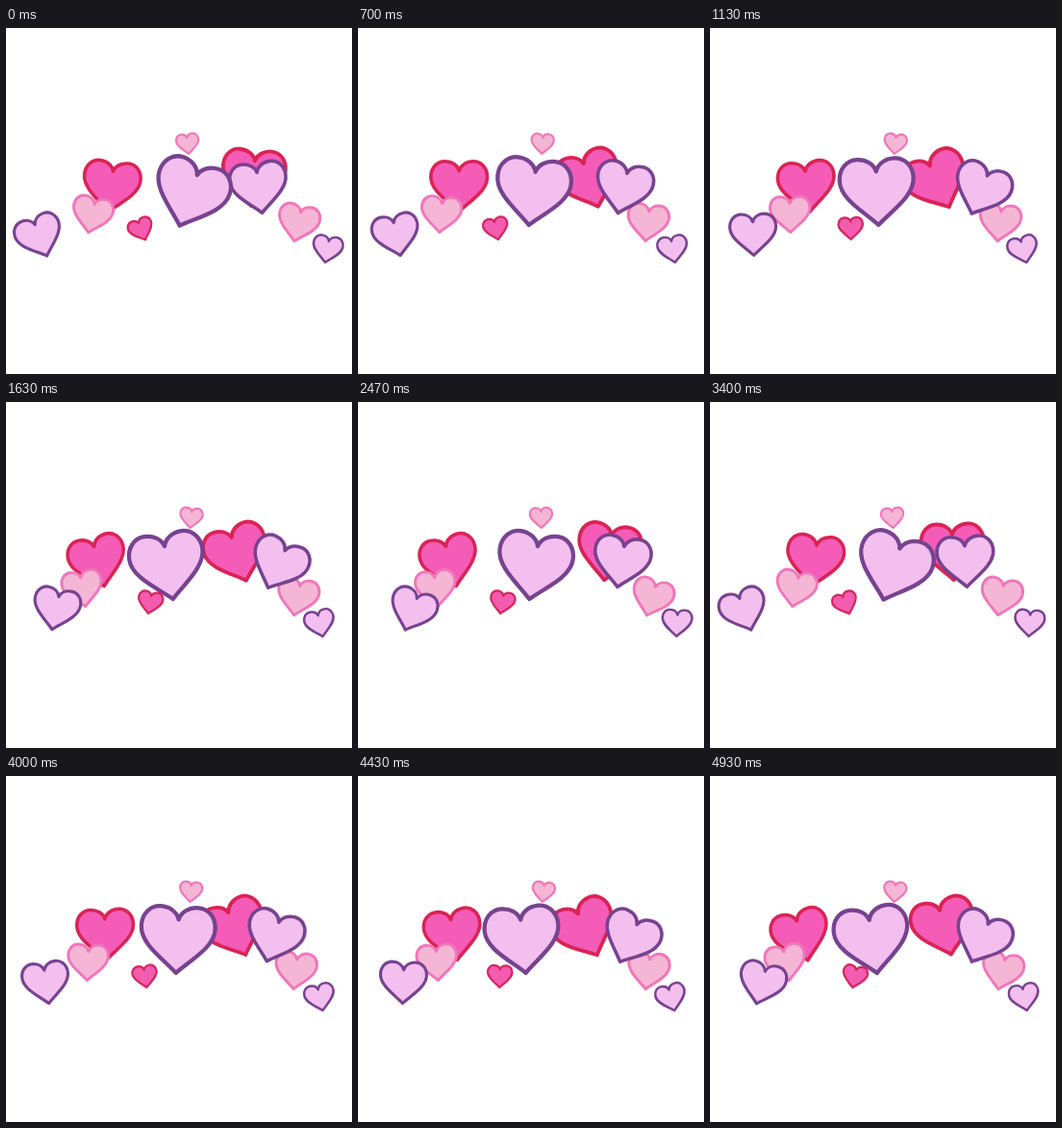
Recreate the animation shown at these times as an HTML page with a canvas. Size 360 by 360 pixels, loop 5 s.

```html
<!DOCTYPE html>
<html lang="en">
<head>
<meta charset="utf-8">
<title>Swaying hearts</title>
<style>
  html, body { margin: 0; width: 100%; height: 100%; overflow: hidden; background: #fff; }
  canvas { display: block; width: 100vw; height: 100vh; }
</style>
</head>
<body>
<canvas id="stage"></canvas>
<script>
const SIZE = 360, LOOP = 5000, CYCLE = 45;
const OUT = 22, BRISK = 22, SLOW = 34;
const canvas = document.getElementById('stage');
const ctx = canvas.getContext('2d');
const ratio = window.devicePixelRatio || 1;
canvas.width = canvas.height = Math.round(SIZE * ratio);

const lilac = { fill: '#f2bfef', line: '#77428f' };
const blush = { fill: '#f5b6d5', line: '#f076ba' };
const hot = { fill: '#f45cb8', line: '#da2354' };
const rose = { fill: '#f45cb0', line: '#d4275f' };

// Back to front: resting tip, height, mean angle, angle added at the turn,
// step of the turn, length of the swing back
const hearts = [];
const add = (color, x, y, h, lean, swing, turn, back) =>
  hearts.push({ color, x, y, h, lean, swing, turn, back });

add(hot, 254, 187, 62, -7, -18, 16, BRISK);
add(hot, 105, 193, 56, -5, -12, 28, SLOW);
add(blush, 298, 223, 41, 12, -5, 12, BRISK);
add(blush, 84, 214, 40, 0, -12, 28, BRISK);
add(lilac, 268, 194, 56, 8, 17, 19, SLOW);
add(lilac, 176, 207, 73, 5, -14, 22, BRISK);
add(lilac, 46, 238, 46, 0, 21, 32, SLOW);
add(lilac, 331, 245, 30, 0, -15, 16, SLOW);
add(rose, 147, 221, 25, -4, 18, 28, SLOW);
add(blush, 191, 132, 23, -1, 8, 17, SLOW);

// Right half of a unit heart with its tip at the origin, then its mirror image
const half = new Path2D('M0 0C.2-.2 .56-.41 .56-.69C.56-.88 .43-1 .285-1C.14-1 .03-.92 0-.81');
const shape = new Path2D('M0 0C.2-.2 .56-.41 .56-.69C.56-.88 .43-1 .285-1C.14-1 .03-.92 0-.81'
  + 'C-.03-.92-.14-1-.285-1C-.43-1-.56-.88-.56-.69C-.56-.41-.2-.2 0 0Z');

// One smooth swing out to the turn, then one back
function angleAt(step, { lean, swing, turn, back }) {
  const length = step < turn ? Math.max(OUT, turn) : back;
  return (lean + swing * Math.cos(Math.PI * (step - turn) / length)) * Math.PI / 180;
}

// Steps last about 70 ms on a 30 Hz clock, which restarts once at tick 99
function stepAt(ms) {
  const tick = Math.floor(ms * 0.03 + 1e-6);
  const count = ticks => Math.floor(ticks / 2.1 + 1e-6);
  return (tick < 99 ? count(tick) : 47 + count(tick - 99)) % CYCLE;
}

function drawHeart(heart, step) {
  const { color, x, y, h } = heart;
  const line = 1.2 + h * 0.042, scale = h - line, drop = h * 0.17;
  ctx.save();
  ctx.translate(x, y + drop);
  ctx.rotate(angleAt(step, heart));
  ctx.translate(0, -drop - line / 2);
  ctx.scale(scale, scale);
  ctx.lineWidth = line / scale;
  ctx.lineJoin = 'round';
  ctx.fillStyle = color.fill;
  ctx.strokeStyle = color.line;
  ctx.fill(shape);
  ctx.stroke(shape);
  ctx.restore();
}

const start = performance.now();
function render() {
  const step = stepAt((performance.now() - start) % LOOP);
  ctx.setTransform(canvas.width / SIZE, 0, 0, canvas.height / SIZE, 0, 0);
  ctx.fillStyle = '#fff';
  ctx.fillRect(0, 0, SIZE, SIZE);
  hearts.forEach(heart => drawHeart(heart, step));
  requestAnimationFrame(render);
}
render();
</script>
</body>
</html>
```
